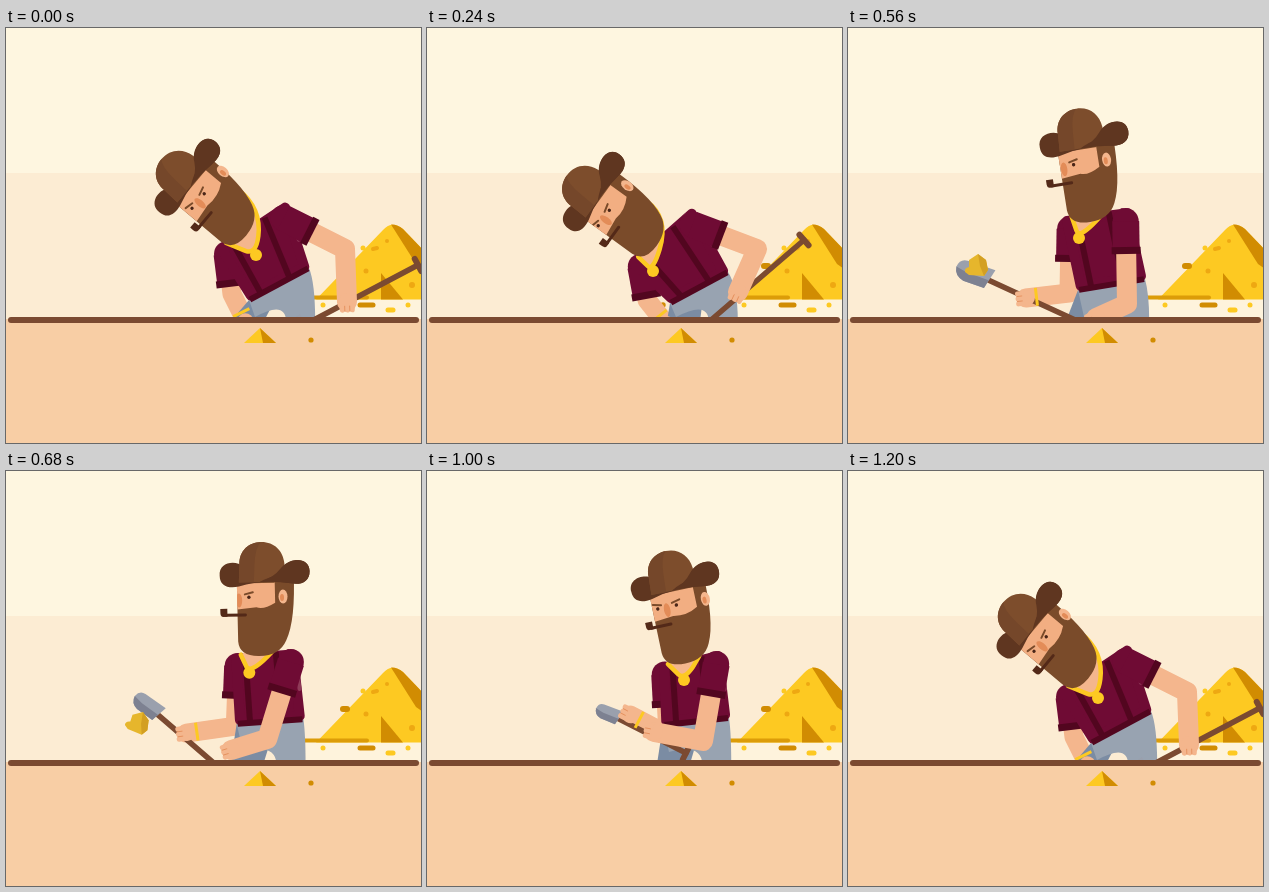
An HTML page with a canvas for the animation above (1.24 s loop, 415 by 415 pixels).

```html
<!DOCTYPE html>
<html lang="en">
<head>
<meta charset="utf-8">
<title>Gold digger at work</title>
<style>
html, body { margin: 0; width: 100%; height: 100%; overflow: hidden; background: #fef6e0; }
canvas { display: block; width: 100vw; height: 100vh; }
</style>
</head>
<body>
<canvas id="stage"></canvas>
<script>
const SIZE = 415, LOOP = 1240, STEP = 40, GROUND = 291;
const canvas = document.getElementById('stage');
const c = canvas.getContext('2d');
const ratio = window.devicePixelRatio || 1;
canvas.width = canvas.height = Math.round(SIZE * ratio);

const C = {
  skin: '#f4b68d', face: '#f2ae82', nose: '#e38c58', shirt: '#6f0b34', shirtDark: '#52061f',
  shine: '#8f3a58', pants: '#98a3b1', pantsFar: '#7b8ca3', hair: '#7a4b2a', crown: '#7d4d2c',
  brim: '#5f3620', pipe: '#532918', wood: '#7b4a31', gold: '#fdc922', goldMid: '#eea812',
  goldDark: '#d18c02', ore: '#e6b62c', steel: '#9aa0ad', steelDark: '#7d8191'
};

// ---------- motion: periodic cubic tracks ----------
const KEYS = [0, 240, 400, 560, 840, 1000, 1200];
function track(rows, times = KEYS) {
  rows = [...rows, rows[0]];
  const n = rows.length;
  const key = i => {
    const w = Math.floor(i / n);
    return [times[i - w * n] + w * LOOP, rows[i - w * n]];
  };
  return t => {
    let i = n - 1;
    while (times[i] > t) i--;
    const [[ta, a], [tb, b], [tc, d], [td, e]] = [-1, 0, 1, 2].map(k => key(i + k));
    const h = tc - tb, s = (t - tb) / h, r = 1 - s;
    return b.map((v, k) => {
      const m0 = (d[k] - a[k]) / (tc - ta) * h, m1 = (e[k] - v) / (td - tb) * h;
      return v * (1 + 2 * s) * r * r + d[k] * s * s * (3 - 2 * s) + m0 * s * r * r - m1 * s * s * r;
    });
  };
}

// x, y, tilt in degrees, turn towards the viewer
const headAt = track([
  [180.5, 149.5, -50, 1], [166, 164, -54, .7], [164.5, 164.5, -55, .45],
  [235, 111, -9, .12], [270.5, 102, -2, 0], [247, 110, -12, .88]
]);
// left shoulder, right shoulder, right waist, left waist
const torsoAt = track([
  [211, 221, 281, 175, 303, 240, 243, 272], [203, 236, 266, 181, 301, 244, 243, 275],
  [202, 228, 264, 182, 299, 252, 239, 280], [215, 190, 282, 181, 297, 251, 230, 262],
  [239, 186, 297, 178, 299, 245, 234, 245], [233, 195, 294, 181, 302, 247, 236, 254]
]);
// elbow, hand
const nearAt = track([
  [339, 221, 341, 274], [330, 221, 311, 264], [301, 252, 274, 289],
  [279, 276, 248, 290], [246, 254, 203, 263], [276, 270, 227, 261]
]);
const farAt = track([
  [226, 266, 240, 294], [220, 272, 239, 296], [205, 273, 203, 297],
  [221, 265, 178, 270], [238, 246, 191, 255], [241, 264, 203, 244]
]);
const medalAt = track([
  [250, 227], [226, 243], [225, 243], [231, 210], [259, 199], [257, 209]
]);
const footAt = track([[225], [240], [225], [218], [234], [230]]);
// blade, grip
const shovelAt = track([
  [285, 304, 412, 237], [262, 311, 377, 212], [240, 318, 347, 244], [127, 246, 262, 308],
  [187, 237, 212, 300], [182, 243, 259, 282], [250, 305, 332, 268]
], [0, 240, 400, 560, 840, 1000, 1120, 1200]);

// ---------- drawing helpers ----------
const mix = (a, b, k) => [a[0] + (b[0] - a[0]) * k, a[1] + (b[1] - a[1]) * k];
const add = (a, b) => [a[0] + b[0], a[1] + b[1]];
const dist = (a, b) => Math.hypot(b[0] - a[0], b[1] - a[1]);
const along = (a, b, d) => mix(a, b, d / (dist(a, b) || 1));
const pairs = a => a.flatMap((v, i) => i % 2 ? [] : [[v, a[i + 1]]]);

function poly(pts, fill, round = 0) {
  c.beginPath();
  pts.forEach(p => c.lineTo(...p));
  c.closePath();
  c.fillStyle = fill;
  c.fill();
  if (!round) return;
  c.strokeStyle = fill;
  c.lineWidth = round;
  c.stroke();
}
function line(pts, color, width, cap = 'round') {
  c.beginPath();
  pts.forEach(p => c.lineTo(...p));
  c.strokeStyle = color;
  c.lineWidth = width;
  c.lineCap = cap;
  c.stroke();
}
function oval(x, y, rx, fill, ry = rx, tilt = 0) {
  c.beginPath();
  c.ellipse(x, y, rx, ry, tilt, 0, 7);
  c.fillStyle = fill;
  c.fill();
}
function shape(d, fill) {
  c.fillStyle = fill;
  c.fill(new Path2D(d));
}
function placed(x, y, angle, draw) {
  c.save();
  c.translate(x, y);
  c.rotate(angle);
  draw();
  c.restore();
}

// ---------- scenery ----------
function backdrop() {
  c.fillStyle = '#fef6e0';
  c.fillRect(0, 0, SIZE, 146);
  c.fillStyle = '#fcecd3';
  c.fillRect(0, 145, SIZE, 150);
  c.fillStyle = '#fef3dc';
  c.fillRect(300, 271, 115, 20);

  shape('M310 271.5 L377 202 Q386 192 397 201 L420 225 V271.5Z', C.gold);
  shape('M385 196.500 Q391 196 397 201 L420 225 V243 L410 236Z', C.goldDark);
  shape('M375 245 L397 271.500 H375Z', C.goldDark);
  line([[337, 238], [341, 238]], C.goldDark, 6);
  line([[367, 221], [371, 220]], C.goldMid, 4);
  oval(357, 220, 2.5, C.gold);
  oval(381, 213, 2, C.goldMid);
  oval(360, 243, 2.5, C.goldMid);
  oval(406, 257, 3, C.goldMid);
  line([[285, 269.5], [361, 269.5]], '#dc9c08', 4);
  line([[354, 277], [367, 277]], C.goldDark, 5);
  line([[382, 282], [387, 282]], C.gold, 5);
  oval(317, 277, 2.5, C.gold);
  oval(402, 277, 2.5, C.gold);
  oval(236, 277, 2.7, C.goldDark);
}
function foreground() {
  c.fillStyle = '#f8cea5';
  c.fillRect(0, GROUND, SIZE, SIZE - GROUND);
  line([[5, 292], [410, 292]], C.wood, 6);
  poly([[254, 300], [270, 315], [238, 315]], C.gold);
  poly([[254, 300], [270, 315], [257, 315]], C.goldDark);
  oval(305, 312, 2.6, C.goldDark);
}

// ---------- miner ----------
function head(x, y, tilt, turn) {
  placed(x, y, tilt * Math.PI / 180, () => {
    shape('M-27 0 L-27 68 Q-26 83 -6 83 Q14 83 21 68 Q31 48 30 0Z', C.hair);
    const edge = 11 + turn * 7;
    c.save();
    c.beginPath();
    c.moveTo(-27, 0);
    c.lineTo(edge, 0);
    c.lineTo(edge, 30);
    c.quadraticCurveTo(edge - 12, 37, -8, 34);
    c.lineTo(-27, 36);
    c.clip();
    c.fillStyle = C.face;
    c.fillRect(-30, 0, 60, 40);
    c.fillStyle = C.hair;
    c.fillRect(-30, 4, 60, 6);
    const sx = turn * 14;
    oval(-25 + sx, 27, 3.2, C.nose, 7);
    for (const [ex, slope] of [[-15, -2], [-34, 2]]) {
      line([[ex - 4 + sx, 20 - slope / 2], [ex + 4 + sx, 20 + slope / 2]], C.hair, 2);
      oval(ex + sx, 24, 1.7, '#4a2618');
    }
    c.restore();

    oval(19 + turn * 9, 24, 4.5, C.skin, 7);
    oval(18 + turn * 9, 25, 2, C.nose, 3.5);

    const px = turn * 8;
    line([[-19 + px, 41.5], [-39 + px, 41.5]], C.pipe, 3);
    shape(`M${-44 + px} 35 h7 v8 h-4 q-3 0 -3 -4Z`, C.pipe);

    shape('M-44 2 C-45 -12 -28 -14 -20 -7 L20 -6 C28 -15 46 -15 46 -1 C46 10 37 13 27 11 Q-2 6 -25 13 C-36 15 -44 12 -44 2Z', C.brim);
    shape('M-25 9 L-24 -9 C-24 -23 -14 -31 -2 -31 C11 -31 20 -22 21 -9 L21 1 Q4 4 -4 9 Q-15 9 -25 9Z', C.crown);
    shape('M-24 -9 C-24 -23 -14 -31 -2 -31 Q-8 -26 -9 -8 L-10 9 L-25 9Z', '#75472a');
    shape('M-4 9 Q10 5 17 -4 C26 -16 46 -15 46 -1 C46 10 37 13 27 11 Q12 8 -4 9Z', C.brim);
  });
}

function hand(p, toward) {
  const a = Math.atan2(p[1] - toward[1], p[0] - toward[0]);
  placed(p[0], p[1], a, () => {
    oval(0, 0, 9, C.skin, 8);
    for (const y of [-5, 0, 5]) line([[4, y], [8, y]], C.skin, 5);
    for (const y of [-2.5, 2.5]) line([[4, y], [9, y]], C.nose, .8);
  });
}

function arm(s, e, h, sleeve, width) {
  line([s, e, h], C.skin, width);
  const end = along(s, e, sleeve);
  oval(...s, 13, C.shirt);
  line([s, end], C.shirt, 27, 'butt');
  line([along(s, e, sleeve - 6), along(s, e, sleeve + 1)], C.shirtDark, 29, 'butt');
}

function blade(b, g) {
  const k = .3 + .7 * dist(b, g) / 149;
  placed(b[0], b[1], Math.atan2(g[1] - b[1], g[0] - b[0]), () => {
    c.scale(k, k);
    shape('M-20 1 Q-20 -8 -12 -9 L17 -12 L14 9 L-8 11 Q-18 10 -20 1Z', C.steel);
    shape('M-20 1 L-8 2 L15 0 L14 9 L-8 11 Q-18 10 -20 1Z', C.steelDark);
  });
}

function nugget(t, b) {
  if (t < 400 || t > 760) return;
  const fall = Math.max(0, t - 600);
  const [x, y] = fall ? [129 + fall * .04, 238 + fall * fall * .0022] : add(b, [2, -8]);
  placed(x, y, fall * .004, () => {
    shape('M-12 6 Q-13 2 -8 1 L-8 -6 L1 -12 L9 -6 L11 4 L7 10 L-8 9Z', C.ore);
    shape('M1 -12 L9 -6 L11 4 L7 10 L3 0Z', '#d39f22');
  });
}

function miner(t) {
  const pose = headAt(t);
  const [tl, tr, wr, wl] = pairs(torsoAt(t));
  const [ne, nh] = pairs(nearAt(t));
  const [fe, fh] = pairs(farAt(t));
  const [b, g] = pairs(shovelAt(t));
  const medal = medalAt(t), foot = footAt(t)[0];
  const down = (p, q, k) => [(q[0] - p[0]) * k, (q[1] - p[1]) * k];
  const nearS = add(mix(tr, tl, .1), down(tr, wr, .16));
  const farS = add(mix(tl, tr, .07), down(tl, wl, .16));

  arm(farS, fe, fh, 32, 19);

  const heel = wr[0] + (wr[0] - tr[0]) * .28;
  poly([wl, mix(wl, wr, .6), [foot + 33, 293], [foot, 293]], C.pantsFar);
  c.beginPath();
  c.moveTo(...wl);
  c.lineTo(...wr);
  c.quadraticCurveTo(heel, wr[1] + 15, heel, 293);
  c.lineTo(heel - 29, 293);
  c.quadraticCurveTo(heel - 30, 272, wl[0] + 6, Math.min(289, wl[1] + 27));
  c.fillStyle = C.pants;
  c.fill();

  const mid = mix(mix(tl, tr, .5), mix(wl, wr, .5), .5);
  poly([tl, tr, wr, wl].map(p => along(p, mid, 5)), C.shirt, 10);
  for (const k of [.2, .68]) line([mix(tl, tr, k), mix(wl, wr, k)], C.shirtDark, 6, 'butt');
  line([along(wl, wr, 1), along(wr, wl, 1)], C.shirtDark, 6, 'butt');
  c.beginPath();
  c.moveTo(...mix(tr, tl, .12));
  c.quadraticCurveTo(...along(tr, mid, 2), ...mix(along(tr, mid, 2), wr, .55));
  c.strokeStyle = C.shine;
  c.lineWidth = 4;
  c.lineCap = 'round';
  c.stroke();

  // neck and chain
  const a = pose[2] * Math.PI / 180, cos = Math.cos(a), sin = Math.sin(a);
  const nape = [pose[0] + 24 * cos - 48 * sin, pose[1] + 24 * sin + 48 * cos];
  const left = mix(tl, tr, .13);
  const side = mix(nape, mix(tl, tr, .75), .75);
  c.beginPath();
  c.moveTo(...nape);
  c.quadraticCurveTo(...side, ...mix(side, medal, .6));
  c.quadraticCurveTo(...medal, ...mix(medal, left, .35));
  c.lineTo(...left);
  c.fillStyle = C.skin;
  c.fill();
  c.strokeStyle = C.gold;
  c.lineWidth = 4.5;
  c.stroke();
  oval(...medal, 6, C.gold);

  // shovel
  const tilt = Math.atan2(g[1] - b[1], g[0] - b[0]);
  const bar = [-Math.sin(tilt) * 7, Math.cos(tilt) * 7];
  line([along(b, g, 8), g], C.wood, 5.5);
  line([add(g, bar), add(g, bar.map(v => -v))], C.wood, 6);
  blade(b, g);
  nugget(t, b);

  hand(fh, fe);
  const wrist = along(fh, fe, 9), q = along(fh, fe, 12);
  line([wrist, q], C.gold, 18, 'butt');

  arm(nearS, ne, nh, 32, 20);
  hand(nh, ne);
  head(...pose);
}

function draw(t) {
  c.setTransform(ratio, 0, 0, ratio, 0, 0);
  c.lineJoin = 'round';
  backdrop();
  miner(t);
  foreground();
}

const start = performance.now();
function tick() {
  const t = (performance.now() - start) % LOOP;
  draw(Math.floor(t / STEP) * STEP);
  requestAnimationFrame(tick);
}
tick();
</script>
</body>
</html>
```
